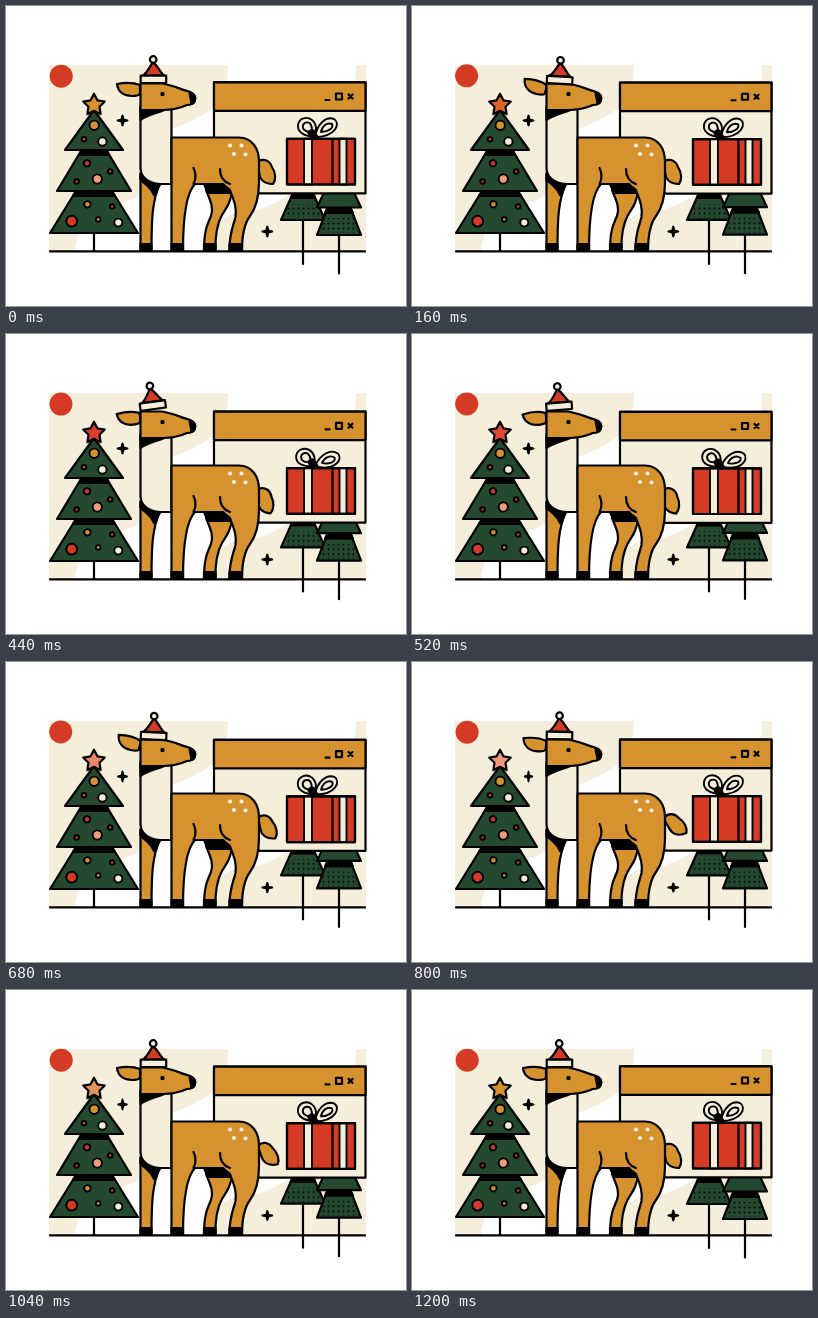
These frames come from a looping animation (400x300 px, 1240 ms). An HTML page:

```html
<!DOCTYPE html>
<html lang="en">
<head>
<meta charset="utf-8">
<title>Winter deer</title>
<style>
html, body { margin: 0; width: 100%; height: 100%; overflow: hidden; background: #fff; }
svg { display: block; width: 100vw; height: 100vh; }
.ln { stroke: #000; stroke-width: 2.2; stroke-linejoin: round; stroke-linecap: round; }
.thin { stroke-width: 1.9; }
.no { fill: none; }
.gold { fill: #d6922e; }
.red { fill: #d43a24; }
.cream { fill: #f5eedb; }
.green { fill: #24492f; }
.pink { fill: #ef9a7c; }
</style>
</head>
<body>
<svg viewBox="0 0 400 300">
  <defs>
    <pattern id="dots" width="5" height="5" patternUnits="userSpaceOnUse">
      <circle cx="2.5" cy="2.5" r="1"/>
    </pattern>
  </defs>

  <!-- backdrop -->
  <path class="cream" d="M43 59H360V245H43Z"/>
  <path fill="#fff" d="M222 59C222 80 217 94 207 102C193 112 180 118 166 123C150 140 150 175 133 189C115 203 72 205 69 245H200C203 215 220 207 245 205C285 198 348 150 350 59Z"/>
  <circle id="sun" class="red" cx="55.2" cy="70.2" r="11.5"/>
  <path class="ln no" d="M44 245.4H359"/>

  <!-- decorated tree -->
  <g class="ln">
    <path d="M88 228V245"/>
    <path class="green" d="M70 185H106L132 227H44Z"/>
    <path d="M70 185H106L109 190H67Z"/>
    <path class="green" d="M75 145H101L125 185H51Z"/>
    <path d="M75 145H101L103 149H73Z"/>
    <path class="green" d="M88 104L117 144H59Z"/>
  </g>
  <g id="balls" class="ln thin"></g>
  <path id="star" class="ln"/>
  <path id="spark1" class="ln" stroke-width="1"/>
  <path id="spark2" class="ln" stroke-width="1"/>

  <!-- small trees -->
  <g id="tree1" class="ln">
    <path class="no" d="M297 214V258"/>
    <path class="green" d="M287 187H307L319 214H275Z"/>
    <path fill="url(#dots)" stroke="none" d="M284 198H310L316 212H278Z"/>
    <path d="M287 187H307L309 192H285Z"/>
  </g>
  <g id="tree2" class="ln">
    <path class="no" d="M333 229V267.5"/>
    <path class="green" d="M321 203H345L355 229H311Z"/>
    <path fill="url(#dots)" stroke="none" d="M319 212H347L352 227H314Z"/>
    <path d="M321 203H345L347 207H319Z"/>
    <path class="green" d="M322 178H344L355 201.5H311Z"/>
  </g>

  <!-- window with gift -->
  <g id="win" class="ln">
    <path class="cream" d="M208 76.3H359.5V187.3H208Z"/>
    <path class="gold" d="M208 76.3H359.5V104.8H208Z"/>
    <path class="no" d="M319.5 94H323.5M330 87.5H336V93.5H330ZM342.5 88.5L346.5 92.5M346.5 88.5L342.5 92.5"/>
    <path class="red" d="M281 132.8H349V178.5H281Z"/>
    <path class="cream thin" d="M298 132.8H306V178.5H298ZM333.5 132.8H340.5V178.5H333.5Z"/>
    <path class="no" d="M326.500 132.8V178.5M281 132.8H349V178.5H281Z"/>
    <g id="bowL" class="thin">
      <path class="cream" d="M308 131C298 130 291 126 292 119C293 112 301 110 306 114C311 118 311 125 308 131Z"/>
      <path class="cream" d="M305 126C299 126 296 123 297 119C299 115 304 116 305 119C306 121 306 124 305 126Z"/>
    </g>
    <g id="bowR" class="thin">
      <path class="cream" d="M309 131C311 118 320 110 328 113C335 117 330 131 309 131Z"/>
      <path class="cream" d="M315 126C316 120 321 116 326 118C328 122 322 126 315 126Z"/>
    </g>
    <path d="M302.500 127C304 123 308 123 309 127L312 131.500H305Z"/>
  </g>

  <!-- deer -->
  <g class="ln">
    <path id="tail" class="gold" d="M252 155C259 152 264 155 266 161C270 167 270 174 267 178C258 178 253 173 253 165Z"/>
    <path class="gold" d="M200 184C204 194 208 201 205 210C201 219 198 225 198 245H209.500C209 228 211 218 216 209C221 201 225 196 226 184Z"/>
    <path d="M198 238H209.500V245H198Z"/>
    <path class="gold" d="M134.500 168V245H145.500C145.500 215 146 194 154 178Z"/>
    <path d="M134.500 167C138 175 145 178 154 178L148 189C145 181 139 178 134.500 174Z"/>
    <path d="M134.500 238H145.500V245H134.500Z"/>
    <path class="cream" d="M134.500 100H165.500V178H154C142 177 134.500 171 134.500 162Z"/>
    <path class="gold" d="M165.500 131.500H233C246 132 253 142 253 156V176C253 192 250 202 244 210C238 218 236 228 236 245H223.500C223 228 227 221 229.500 211C231 200 227 193 224 184L216 178H189C181 186 177 206 177 245H165.500Z"/>
    <path d="M198 178H217L224 187H202Z"/>
    <path d="M165.500 238H177V245H165.500ZM223.500 238H236V245H223.500Z"/>
    <path class="no" d="M187.500 162C190 167 190 173 187.500 178M214 163C214 171 218 176 224 178"/>
    <path id="ear" class="gold" d="M134 79C129 77 121 76 111 78C112 86 118 90 126 90C130 90 133 89 134 88Z"/>
    <path d="M134.500 103H160C153 107 143 108 134.500 114Z"/>
    <path class="gold" d="M134.500 77.500H156C166 79 174 83 183 85.500C188 87 190 91 189 94C188 98 185 99 181 99C172 103 165 104 157 104H134.500Z"/>
    <path d="M183.500 86C188 87 190 91 189 94C188 97 187 98 185.500 97.500C185 93 184 90 183.500 86Z"/>
    <g id="hat">
      <path class="red" d="M137 69.500C142 66 144 60 147 56C151 59 154 66 158 69.500Z"/>
      <path class="cream" d="M134.700 69.700H160.200V77H134.700Z"/>
      <circle class="cream" cx="147.200" cy="53.500" r="3.300"/>
    </g>
  </g>
  <circle cx="156.500" cy="88" r="2.200"/>
  <g class="cream">
    <circle cx="224" cy="139.500" r="2.100"/>
    <circle cx="235.500" cy="139.500" r="2.100"/>
    <circle cx="228" cy="148" r="2.100"/>
    <circle cx="239.500" cy="148.500" r="2.100"/>
  </g>
</svg>
<script>
const LOOP = 1240, STEP = 40;
const el = id => document.getElementById(id);
const put = (id, name, value) => el(id).setAttribute(name, value);
const move = (id, value) => put(id, 'transform', value);

// Smooth interpolation through [time, value] pairs
function track(t, keys) {
  let i = 0;
  while (i < keys.length - 2 && t >= keys[i + 1][0]) i++;
  const [t0, a] = keys[i], [t1, b] = keys[i + 1];
  const p = Math.min(1, Math.max(0, (t - t0) / (t1 - t0)));
  return a + (b - a) * (1 - Math.cos(Math.PI * p)) / 2;
}

function mix(t, stops) {
  return 'rgb(' + [1, 2, 3].map(c =>
    Math.round(track(t, stops.map(s => [s[0], s[c]])))).join() + ')';
}

function starPath(cx, cy, big, small, n) {
  let d = '';
  for (let i = 0; i < n * 2; i++) {
    const r = i % 2 ? small : big, a = i * Math.PI / n - Math.PI / 2;
    d += (i ? 'L' : 'M') + (cx + r * Math.cos(a)).toFixed(2) + ' ' + (cy + r * Math.sin(a)).toFixed(2);
  }
  return d + 'Z';
}

const balls = [
  [88.2, 119.3, 4.7, 'gold'], [78, 133.2, 2.3, 'red'], [96.4, 135.6, 4.2, 'cream'],
  [81, 157.3, 3.2, 'red'], [104.2, 165.5, 2.3, 'red'], [70.6, 175.5, 2.3, 'red'],
  [91.3, 173, 4.6, 'pink'], [81.4, 198.3, 3.2, 'gold'], [106.2, 200.5, 2.3, 'red'],
  [65.7, 215.2, 5.4, 'red'], [92.2, 213.4, 2.3, 'gold'], [112.3, 216.6, 4, 'cream']
];
el('balls').innerHTML = balls.map(([x, y, r, c]) =>
  `<circle class="${c}" cx="${x}" cy="${y}" r="${r}"/>`).join('');
put('star', 'd', starPath(88, 99, 11.3, 5.8, 5));
put('spark1', 'd', starPath(0, 0, 4.8, 1.3, 4));
put('spark2', 'd', starPath(0, 0, 4.8, 1.3, 4));

const starColor = [
  [0, 214, 146, 46], [320, 218, 56, 38], [440, 220, 62, 44],
  [780, 240, 152, 122], [900, 240, 152, 122], [1180, 214, 146, 46], [LOOP, 214, 146, 46]
];
const hatTilt = [[0, 0], [140, 3.5], [420, -8], [680, 2.5], [880, 0], [LOOP, 0]];
const earTilt = [[0, 0], [160, 13], [320, 0], [480, -6], [540, -6], [680, 13], [880, 0], [LOOP, 0]];
const tailTilt = [[0, 0], [160, 0], [520, 8], [880, -28], [1200, 0], [LOOP, 0]];
const bowOpen = [[0, 0], [160, 0], [360, 1], [500, 1], [720, 0], [LOOP, 0]];
const sunShift = [[0, 0], [160, -.6], [320, 0], [600, -.6], [880, 0], [LOOP, 0]];
const treeLift = [[0, 0], [160, -.3], [520, -2.6], [880, -2.6], [1200, 0], [LOOP, 0]];
const sparkle = [[0, 0], [560, 0], [880, 1], [1180, 0], [LOOP, 0]];

function draw(t) {
  const wave = (1 - Math.cos(2 * Math.PI * t / LOOP)) / 2;
  const open = track(t, bowOpen), lift = track(t, treeLift);
  const shift = track(t, sunShift), glint = track(t, sparkle);
  put('star', 'fill', mix(t, starColor));
  move('hat', `rotate(${track(t, hatTilt)} 134 77)`);
  move('ear', `rotate(${track(t, earTilt)} 134 83)`);
  move('tail', `rotate(${track(t, tailTilt)} 254 157)`);
  move('bowL', `rotate(${-10 * open} 308 131)`);
  move('bowR', `rotate(${14 * open} 309 131)`);
  move('win', `translate(0 ${1.6 * wave})`);
  move('tree1', `translate(0 ${lift * .25})`);
  move('tree2', `translate(0 ${lift})`);
  move('sun', `translate(${shift} ${shift * .6})`);
  move('spark1', `translate(116.5 114.5) scale(${1 - .25 * glint} 1)`);
  move('spark2', `translate(261.3 225.5) scale(1 ${1 - .2 * glint})`);
}

const start = performance.now();
function tick() {
  const t = (performance.now() - start) % LOOP;
  draw(Math.floor(t / STEP) * STEP);
  requestAnimationFrame(tick);
}
tick();
</script>
</body>
</html>
```
